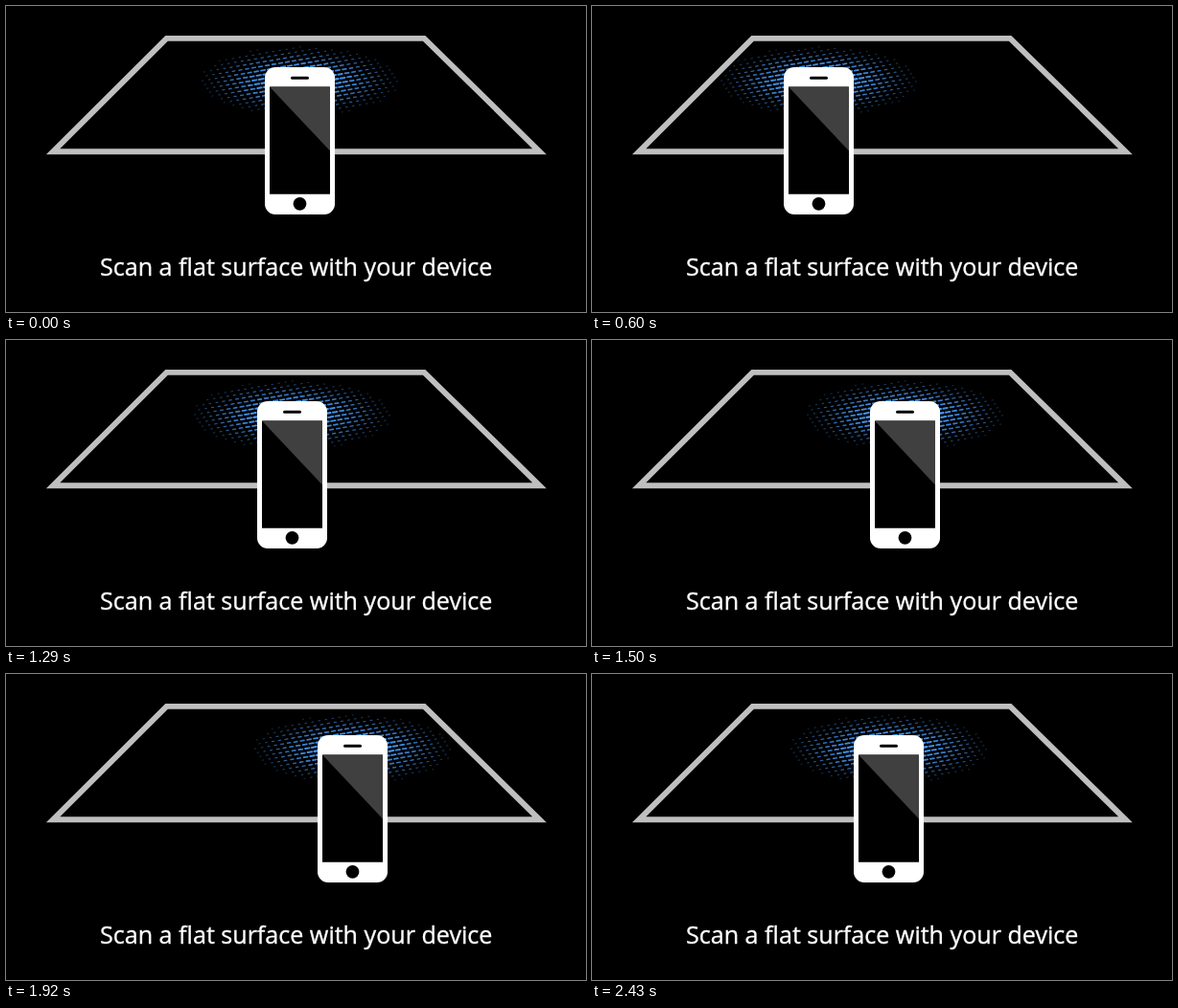
Write an HTML page that moves like this. It is 605 px wide and 320 px high and loops after 2.46 s.

```html
<!DOCTYPE html>
<html lang="en">
<head>
<meta charset="utf-8">
<title>Scan a flat surface</title>
<style>
html, body { margin: 0; width: 100%; height: 100%; overflow: hidden; background: #000; }
svg { display: block; width: 605px; height: 320px; }
text { font: 25.1px "Open Sans", "Noto Sans", sans-serif; fill: #fff; stroke: #fff; stroke-width: .35px; }
</style>
</head>
<body>
<svg viewBox="0 0 605 320">
  <rect width="605" height="320"/>
  <path d="M167.5 33.9H436.2L556.6 152.3H49Z" fill="none" stroke="#bfbfbf" stroke-width="5.9"/>
  <g id="scanner">
    <g id="glow" stroke="#4799f5" stroke-linecap="round"></g>
    <rect y="64" width="73" height="154" rx="11" fill="#fff"/>
    <rect x="27" y="73.8" width="19" height="3" rx="1.5"/>
    <rect x="5" y="84.6" width="63" height="112.2" rx=".5"/>
    <path d="M5 84.6H68V151.6Z" fill="#404040"/>
    <circle cx="36.5" cy="206.8" r="6.9"/>
  </g>
  <text x="98" y="282">Scan a flat surface with your device</text>
</svg>
<script>
const LOOP = 2460, STEP = 30;
const scanner = document.getElementById("scanner");
const glow = document.getElementById("glow");

// Time and left edge of the phone
const keys = [
  [0, 270], [330, 232], [540, 207], [615, 200], [870, 223], [1080, 240],
  [1290, 262], [1620, 306], [1710, 318], [1830, 330], [2130, 300], [2430, 273]
];

function key(i) {
  const n = keys.length, turn = Math.floor(i / n);
  const [t, x] = keys[i - turn * n];
  return [t + turn * LOOP, x];
}

function slope(i) {
  const [a, b, c] = [key(i - 1), key(i), key(i + 1)];
  const s1 = (b[1] - a[1]) / (b[0] - a[0]);
  const s2 = (c[1] - b[1]) / (c[0] - b[0]);
  return s1 * s2 <= 0 ? 0 : 2 * s1 * s2 / (s1 + s2);
}

// Monotone cubic through the keys
function phoneX(t) {
  let i = keys.length - 1;
  while (key(i)[0] > t) i--;
  const [t0, x0] = key(i), [t1, x1] = key(i + 1);
  const h = t1 - t0, u = (t - t0) / h, v = 1 - u;
  return x0 * v * v * (1 + 2 * u) + x1 * u * u * (1 + 2 * v)
    + h * u * v * (v * slope(i) - u * slope(i + 1));
}

// Skewed halftone of dashes that shrink towards the rim
function buildGlow() {
  const cx = 36.5, cy = 78.5, rx = 104, ry = 36;
  for (let row = -14; row <= 14; row++) {
    for (let col = -20; col <= 20; col++) {
      const x = col * 7 + row * 2.6, y = row * 4 - col * 1.2;
      const d = Math.hypot(x / rx, y / ry);
      if (d >= 1) continue;
      const k = Math.min(1, 1.6 * (1 - d));
      const half = 0.5 + 1.9 * k;
      const dash = document.createElementNS("http://www.w3.org/2000/svg", "path");
      dash.setAttribute("d", `M${cx + x - half} ${cy + y + half * 0.17}l${half * 2} ${-half * 0.34}`);
      dash.setAttribute("stroke-width", 0.8 + 1.3 * k);
      dash.setAttribute("opacity", 0.35 + 0.65 * k);
      glow.append(dash);
    }
  }
}

function draw(now) {
  const t = Math.floor((now % LOOP) / STEP) * STEP;
  scanner.setAttribute("transform", `translate(${Math.round(phoneX(t))} 0)`);
}

buildGlow();
draw(0);
let start;
function tick(now) {
  start ??= now;
  draw(now - start);
  requestAnimationFrame(tick);
}
requestAnimationFrame(tick);
</script>
</body>
</html>
```
